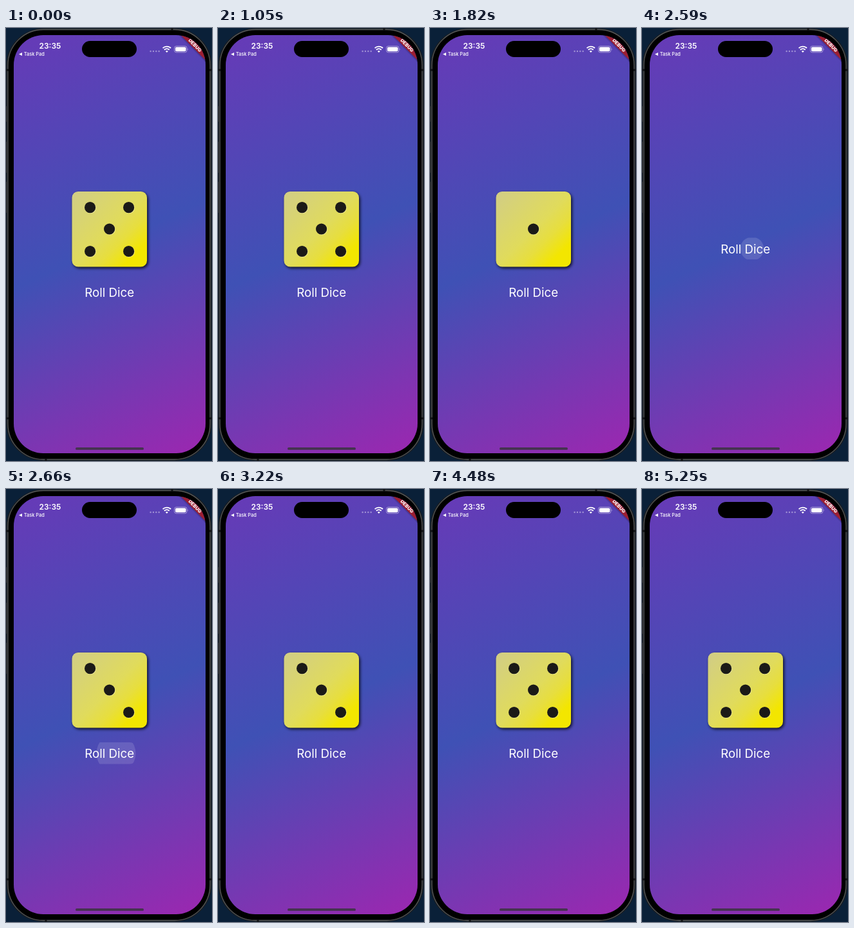
An HTML page for the animation above (5.32 s loop, 320 by 670 pixels).

```html
<!DOCTYPE html>
<html lang="en">
<head>
<meta charset="utf-8">
<title>Roll Dice</title>
<style>
  html, body { margin: 0; width: 100%; height: 100%; overflow: hidden; background: #0a2038; }
  svg { display: block; width: 320px; height: 670px; font-family: Inter, Roboto, sans-serif; fill: #fff; }
</style>
</head>
<body>
<svg viewBox="0 0 320 670">
  <defs>
    <linearGradient id="wall" gradientUnits="userSpaceOnUse" x1="12" y1="11" x2="310" y2="658">
      <stop stop-color="#673ab7"/>
      <stop offset=".5" stop-color="#3f51b5"/>
      <stop offset="1" stop-color="#9c27b0"/>
    </linearGradient>
    <linearGradient id="gold" x2="1" y2="1">
      <stop stop-color="#d1cd86"/>
      <stop offset=".5" stop-color="#e0db5c"/>
      <stop offset=".66" stop-color="#e7de3e"/>
      <stop offset=".84" stop-color="#f3e600"/>
      <stop offset="1" stop-color="#f3e600"/>
    </linearGradient>
    <filter id="blur" x="-20%" y="-20%" width="140%" height="140%"><feGaussianBlur stdDeviation="2.2"/></filter>
    <clipPath id="screen"><rect x="12" y="11" width="298" height="647" rx="46"/></clipPath>
    <clipPath id="pill"><rect x="116" y="392" width="92" height="33.5" rx="16.7"/></clipPath>
  </defs>

  <!-- phone body -->
  <rect x=".5" y=".5" width="319" height="669" rx="58" fill="#1c1e20"/>
  <rect x="3" y="2.5" width="314" height="665" rx="55" fill="#000" stroke="#55585a" stroke-width="1.3"/>
  <path d="M0 65h4M316 65h4M0 604h4M316 604h4M258 0v4M62 666v4" stroke="#101214" stroke-width="3"/>
  <path d="M.5 121v24M.5 176v48M.5 238v48" stroke="#33363a"/>

  <g clip-path="url(#screen)">
    <rect x="12" y="11" width="298" height="647" fill="url(#wall)"/>
    <g transform="translate(293.7 26.7) rotate(45)">
      <rect x="-50" y="-4.7" width="100" height="9.4" fill="#000" opacity=".5" filter="url(#blur)"/>
      <rect x="-50" y="-4.7" width="100" height="9.4" fill="#9c1f33"/>
      <text y="2.6" font-size="7.3" font-weight="800" text-anchor="middle">DEBUG</text>
    </g>
  </g>

  <!-- status bar -->
  <text x="51.5" y="32" font-size="12" font-weight="600" textLength="none">23:35</text>
  <path d="M20 40.5l5-2.6v5.2z"/>
  <text x="27.7" y="43.2" font-size="7.4" font-weight="500">Task Pad</text>
  <rect x="118" y="20" width="85" height="25" rx="12.5" fill="#000"/>
  <path d="M224.6 36h13.2" stroke="#fff" stroke-width="2.4" stroke-linecap="round" stroke-dasharray="0 4.35" opacity=".42"/>
  <g fill="none" stroke="#fff" stroke-width="1.9">
    <path d="M243.6 31.2a8.8 8.8 0 0 1 12.4 0M245.9 33.7a5.6 5.6 0 0 1 7.8 0"/>
    <path d="M249.8 38l-2-2.1a2.9 2.9 0 0 1 4 0z" fill="#fff" stroke="none"/>
  </g>
  <rect x="261.5" y="28" width="19.5" height="9.8" rx="3" fill="none" stroke="#fff" opacity=".45"/>
  <rect x="263" y="29.5" width="16.5" height="6.8" rx="1.8"/>
  <path d="M282 31.2q1.6 1.7 0 3.4z" opacity=".5"/>
  <rect x="108" y="649" width="106" height="3.8" rx="1.9" fill="#44334f"/>

  <g id="dice">
    <rect x="104" y="255" width="117" height="117" rx="10" fill="#000" opacity=".75" filter="url(#blur)"/>
    <rect x="102.5" y="253" width="116.5" height="116.5" rx="9.5" fill="url(#gold)"/>
    <g id="pips"></g>
  </g>
  <g id="button">
    <g clip-path="url(#pill)"><circle id="ripple" cy="409"/></g>
    <text x="160.7" y="416" font-size="18.7" text-anchor="middle">Roll Dice</text>
  </g>
</svg>
<script>
const $ = id => document.getElementById(id);
const LOOP = 5320, STEP = 70;
const taps = [
  { at: 1120, face: 1, x: 167.5, r: 6, loads: true },
  { at: 2520, face: 3, x: 171, r: 6, loads: true },
  { at: 3920, face: 5, x: 162, r: 32 },
];

const pip = (x, y) =>
  `<circle cx="${x + .7}" cy="${y + .7}" r="8.7" fill="#f4efb0" opacity=".6"/>
   <circle cx="${x}" cy="${y}" r="8.6" fill="#1b1a17"/>`;
const center = pip(160.6, 311);
const diagonal = pip(130.6, 277.7) + pip(190.6, 345.5);
const corners = diagonal + pip(190.6, 277.7) + pip(130.6, 345.5);
const faces = { 1: center, 3: center + diagonal, 5: center + corners };
let shown;

function draw(t) {
  let face = 5, loading = false, alpha = 0;
  for (const tap of taps) {
    const dt = t - tap.at;
    if (dt < 0) continue;
    if (dt >= STEP) face = tap.face;
    if (tap.loads && dt >= STEP && dt < 2 * STEP) loading = true;
    if (dt < 490) {
      alpha = .13 * Math.min(1, (dt + 35) / 75, (490 - dt) / 330);
      $('ripple').setAttribute('cx', tap.x);
      $('ripple').setAttribute('r', tap.r + .175 * dt);
    }
  }
  $('ripple').setAttribute('opacity', alpha);
  // The column collapses while a new face is still loading.
  $('dice').style.display = loading ? 'none' : '';
  $('button').setAttribute('transform', `translate(0 ${loading ? -67.5 : 0})`);
  if (face !== shown) $('pips').innerHTML = faces[shown = face];
}

const start = performance.now();
function tick() {
  const t = (performance.now() - start) % LOOP;
  draw(Math.floor(t / STEP) * STEP);
  requestAnimationFrame(tick);
}
tick();
</script>
</body>
</html>
```
